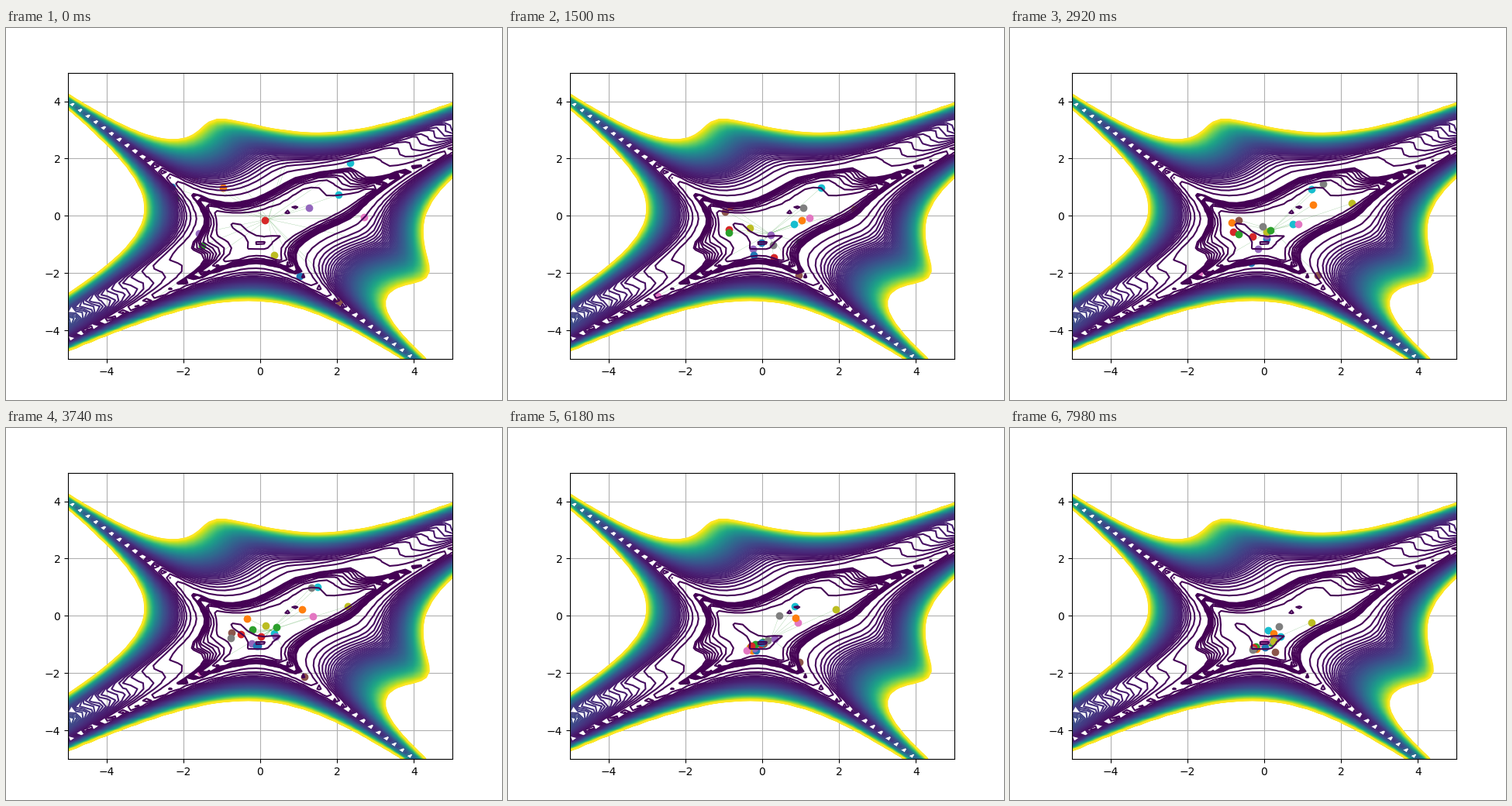
A matplotlib script that plays this animation: 640x480 px, repeating every 8 s.

```python
import numpy as np
import matplotlib.pyplot as plt
from matplotlib.animation import FuncAnimation
from matplotlib.collections import LineCollection

FRAMES, STEP = 400, 20
BEST = np.array([0.0, -1.0])
VALLEY = np.array([0.8, 0.6])


def cost(x, y):
    """Goldstein-Price function, minimum at (0, -1)."""
    a = 19 - 14 * x + 3 * x**2 - 14 * y + 6 * x * y + 3 * y**2
    b = 18 - 32 * x + 12 * x**2 + 48 * y - 36 * x * y + 27 * y**2
    return (1 + (x + y + 1)**2 * a) * (30 + (2 * x - 3 * y)**2 * b)


# Colour, starting point and personal best of each particle
SWARM = [
    ("C9", (2.34, 1.85), (1.5, 1.05)), ("C9", (2.04, 0.74), (0.5, -0.5)),
    ("C3", (0.12, -0.15), (-0.8, -0.45)), ("C1", (-0.97, 0.98), (-0.8, 0.1)),
    ("C0", (1.03, -2.1), (0.2, -0.9)), ("C2", (-1.51, -1.04), (-0.6, -0.4)),
    ("C5", (2.06, -2.99), (1.2, -2.2)), ("C4", (1.27, 0.28), (0.1, -0.9)),
    ("C4", (-1.59, -0.61), (-0.3, -0.9)), ("C6", (2.7, -0.04), (1.1, -0.1)),
    ("C8", (0.36, -1.37), (-0.2, -0.6)), ("C8", (3.6, -1.1), (2.4, 0.45)),
    ("C6", (-3.6, -3.7), (-2.8, -2.8)), ("C1", (0.8, 2.3), (1.0, 0.3)),
    ("C7", (0.7, 2.4), (1.2, 0.85)), ("C5", (-1.7, 1.4), (-0.8, -0.2)),
    ("C2", (-2.2, 0.6), (0.3, -0.6)), ("C3", (-1.0, 2.0), (-0.1, -0.8)),
    ("C7", (2.1, -2.7), (-0.5, -0.5)), ("C0", (-2.3, 1.0), (-0.3, -1.3)),
]
colors = [c for c, _, _ in SWARM]
start = np.array([s for _, s, _ in SWARM])
own = np.array([p for _, _, p in SWARM])

rng = np.random.default_rng(4)
count = len(SWARM)
speed = rng.uniform(0.07, 0.13, (count, 1))
phase = rng.uniform(0, 2 * np.pi, (count, 1))
reach = rng.uniform(0.2, 0.6, (count, 1))
life = np.maximum(190, 290 + 70 * own[:, :1])


def swarm(t):
    """Swing in around the personal best, then drift to the global one."""
    hold = np.exp(-(t / life)**4)
    swing = np.exp(-t / 55) * np.cos(speed * t)
    along = reach * np.sin(speed * t + phase) * VALLEY
    across = 0.08 * np.cos(1.6 * speed * t + phase) * VALLEY[::-1] * [1, -1]
    wander = (1 - np.exp(-t / 80)) * (along + across)
    return BEST + (own - BEST) * hold + (start - own) * swing + wander


fig, ax = plt.subplots(figsize=(6.4, 4.8), dpi=100)
ax.set(xlim=(-5, 5), ylim=(-5, 5))

# Contours and frame are drawn once into a transparent layer above the dots
grid = np.linspace(-5, 5, 50)
X, Y = np.meshgrid(grid, grid)
levels = np.r_[10, 66, np.linspace(0, 1e4, 10)[1:], np.linspace(0, 3e6, 100)[1:]]
lines = ax.contour(X, Y, cost(X, Y), levels=levels)
fig.patch.set_alpha(0)
ax.patch.set_alpha(0)
fig.canvas.draw()
layer = np.array(fig.canvas.buffer_rgba())
lines.remove()
fig.patch.set_alpha(1)
fig.figimage(layer, origin="upper", zorder=5)
ax.spines[:].set_visible(False)
ax.tick_params(length=0, labelleft=False, labelbottom=False)
ax.grid(True)

dots = [ax.plot([], [], "o", color=c)[0] for c in colors]
rays = LineCollection([], colors="g", linewidths=0.1, zorder=1.9)
ax.add_collection(rays, autolim=False)


def draw(n):
    pos = swarm(n)
    mean = pos.mean(axis=0)
    rays.set_segments([(mean, p) for p in pos])
    for dot, (x, y) in zip(dots, pos):
        dot.set_data([x], [y])
    return [rays, *dots]


anim = FuncAnimation(fig, draw, frames=FRAMES, interval=STEP, repeat=True,
                     repeat_delay=0, blit=False)
plt.show()
```
